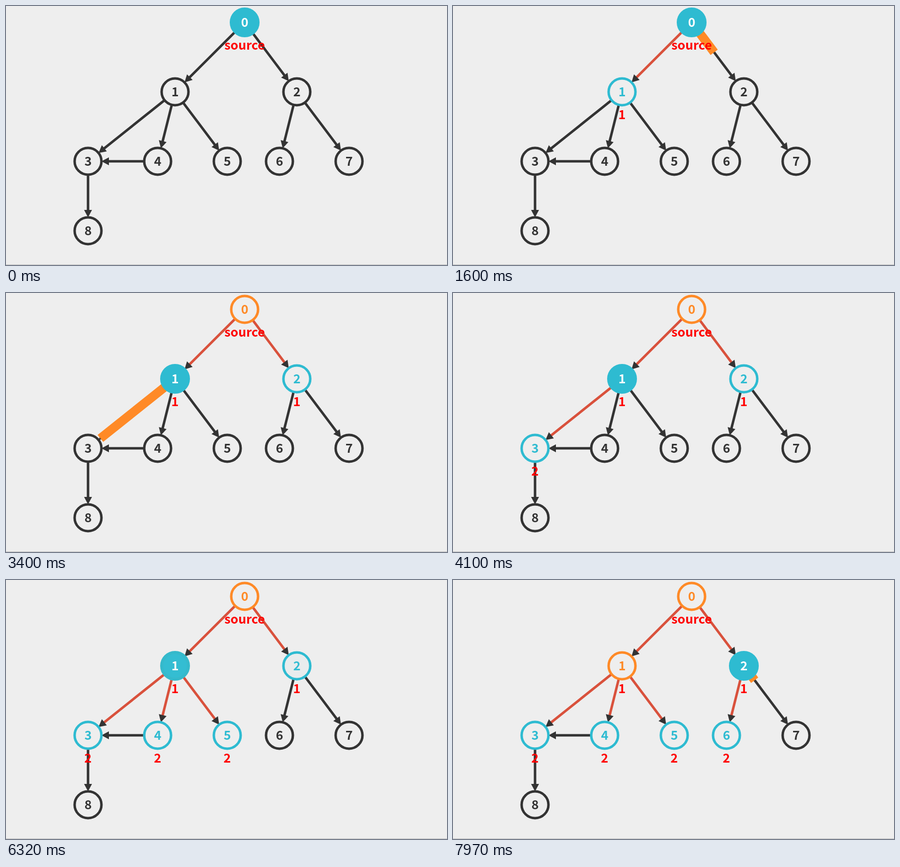
Animation of 887x522 px, one loop 8000 ms. Source, as an HTML page:

```html
<!DOCTYPE html>
<html lang="en">
<head>
<meta charset="utf-8">
<title>Breadth-first search</title>
<style>
  html, body { margin: 0; width: 100%; height: 100%; overflow: hidden; background: #eee; }
  svg { display: block; width: 887px; height: 522px; }
  text {
    font: bold 25px "Noto Sans CJK JP", "Noto Sans CJK SC", "Noto Sans CJK", "Open Sans", sans-serif;
    text-anchor: middle;
  }
  .label { fill: #f00; }
  .wide { stroke: #ff8a27; stroke-width: 18; }
  .arrow { fill: #333; }
</style>
</head>
<body>
<svg id="stage" viewBox="0 0 887 522">
  <g id="edges"></g>
  <g id="nodes"></g>
  <g id="labels"></g>
  <rect y="521" width="887" height="1" fill="#bbb"/>
</svg>
<script>
const LOOP = 8000, START = 272, STEP = 540;

const DARK = [51, 51, 51], PAPER = [238, 238, 238], WHITE = [255, 255, 255];
const CYAN = [46, 187, 209], ORANGE = [255, 138, 39], RED = [217, 81, 60];

// Look of a node: ring, fill, digit, ring width
const LOOKS = {
  idle:   [DARK, PAPER, DARK, 5],
  queued: [CYAN, PAPER, CYAN, 5],
  active: [CYAN, CYAN, WHITE, 6],
  done:   [ORANGE, PAPER, ORANGE, 5]
};

// x, y, first look, then [step, look] changes
const NODES = [
  [480, 33, 'active', [4, 'done']],
  [340, 173, 'idle', [1, 'queued'], [4, 'active'], [11, 'done']],
  [585, 173, 'idle', [3, 'queued'], [11, 'active']],
  [165, 313, 'idle', [6, 'queued']],
  [305, 313, 'idle', [8, 'queued']],
  [445, 313, 'idle', [10, 'queued']],
  [550, 313, 'idle', [13, 'queued']],
  [690, 313, 'idle'],
  [165, 453, 'idle']
];

// from, to, step in which the edge is walked
const EDGES = [
  [0, 1, 0], [0, 2, 2], [1, 3, 5], [1, 4, 7], [1, 5, 9],
  [2, 6, 12], [2, 7, 14], [4, 3], [3, 8]
];

// node, text, step in which it appears
const LABELS = [
  [0, 'source', -1], [1, '1', 1], [2, '1', 3], [3, '2', 6],
  [4, '2', 8], [5, '2', 10], [6, '2', 13]
];

const $ = id => document.getElementById(id);

function add(parent, tag, attrs, text) {
  const el = document.createElementNS('http://www.w3.org/2000/svg', tag);
  set(el, attrs);
  if (text) el.textContent = text;
  return parent.appendChild(el);
}

function set(el, attrs) {
  for (const key in attrs) el.setAttribute(key, attrs[key]);
}

const clamp = u => Math.min(1, Math.max(0, u));
const ease = u => u < 0.5 ? 4 * u ** 3 : 1 - 4 * (1 - u) ** 3;
const mix = (a, b, p) => a + (b - a) * p;
const rgb = (a, b, p) => `rgb(${a.map((v, i) => Math.round(mix(v, b[i], p)))})`;
const show = (el, on) => el.setAttribute('visibility', on ? 'visible' : 'hidden');

const edges = EDGES.map(([from, to, step]) => {
  const [x1, y1] = NODES[from], [x2, y2] = NODES[to];
  const length = Math.hypot(x2 - x1, y2 - y1);
  const angle = Math.atan2(y2 - y1, x2 - x1) * 180 / Math.PI;
  const g = add($('edges'), 'g', { transform: `translate(${x1} ${y1}) rotate(${angle})` });
  const thin = add(g, 'path', { d: `M28 0H${length - 40}`, stroke: rgb(DARK, DARK, 0), 'stroke-width': 5 });
  add(g, 'path', { class: 'arrow', d: `M${length - 27} 0l-15 -8v16z` });
  const wide = add(g, 'path', { class: 'wide' });
  return { step, length, thin, wide };
});

const nodes = NODES.map(([x, y, first, ...changes], i) => {
  const g = add($('nodes'), 'g', { transform: `translate(${x} ${y})` });
  const disc = add(g, 'circle', { r: 27 });
  const digit = add(g, 'text', { y: 9 }, String(i));
  return { disc, digit, first, changes };
});

const labels = LABELS.map(([node, text, step]) => {
  const [x, y] = NODES[node];
  return { step, el: add($('labels'), 'text', { class: 'label', x, y: y + 55 }, text) };
});

function drawEdge({ step, length, thin, wide }, now) {
  if (step === undefined) return;
  const walked = now >= step + 1;
  const growing = now > step && !walked;
  show(wide, growing);
  if (growing) set(wide, { d: `M28 0H${mix(28, length - 26, ease(now - step))}` });
  thin.setAttribute('stroke', walked
    ? rgb(ORANGE, RED, ease(clamp(now - step - 1)))
    : rgb(DARK, DARK, 0));
}

function drawNode({ disc, digit, first, changes }, now) {
  let from = first, to = first, p = 0;
  for (const [step, look] of changes) {
    if (now < step) break;
    from = to;
    to = look;
    p = ease(clamp(now - step));
  }
  const a = LOOKS[from], b = LOOKS[to];
  set(disc, {
    stroke: rgb(a[0], b[0], p),
    fill: rgb(a[1], b[1], p),
    'stroke-width': mix(a[3], b[3], p)
  });
  digit.setAttribute('fill', rgb(a[2], b[2], p));
}

function draw(ms) {
  const now = (ms % LOOP - START) / STEP;
  edges.forEach(e => drawEdge(e, now));
  nodes.forEach(n => drawNode(n, now));
  labels.forEach(l => show(l.el, now >= l.step));
}

const begin = performance.now();
function tick() {
  draw(performance.now() - begin);
  requestAnimationFrame(tick);
}
draw(0);
requestAnimationFrame(tick);
</script>
</body>
</html>
```
